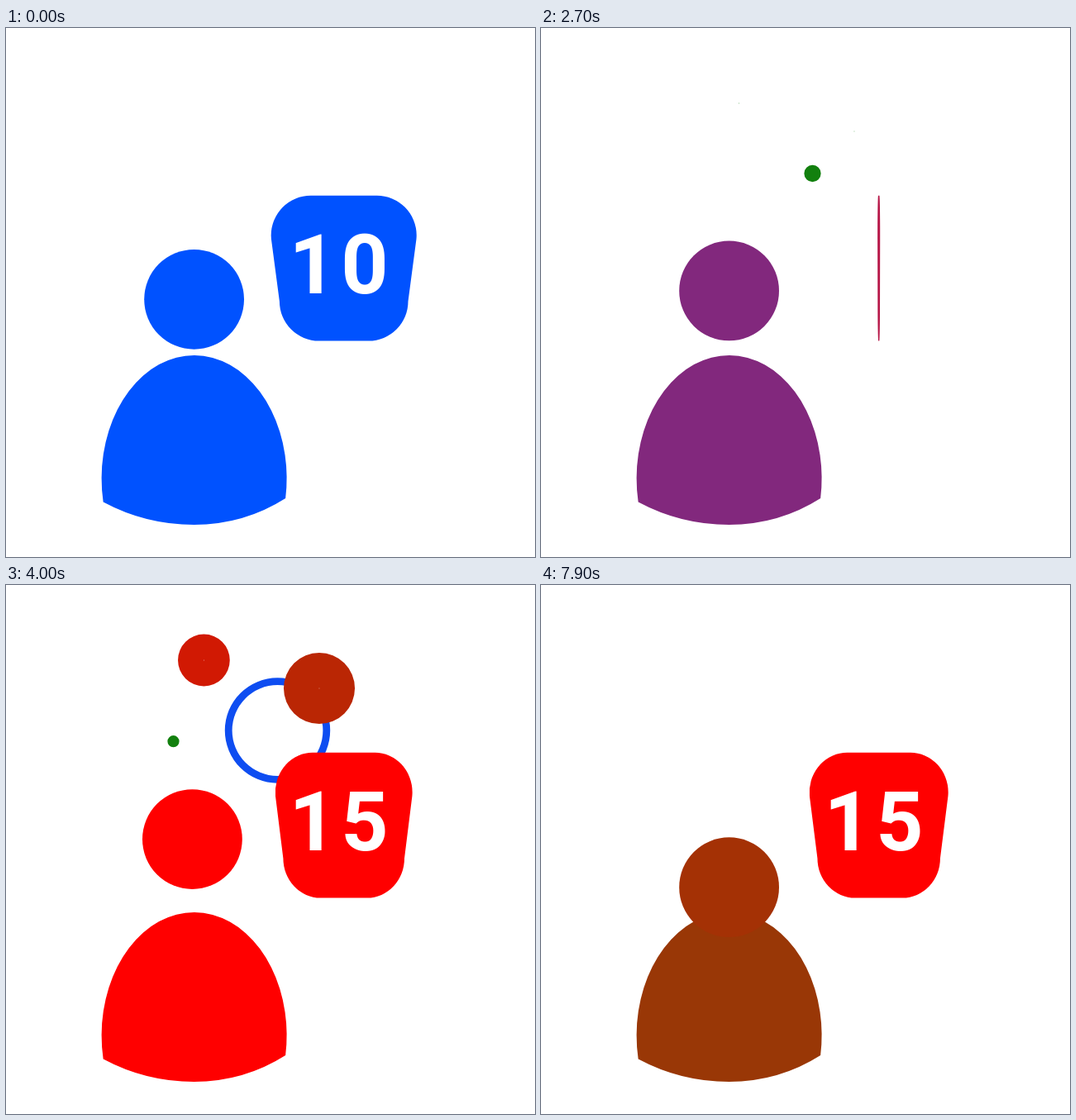
An HTML page with a canvas for the animation above (8 s loop, 640 by 640 pixels).

```html
<!DOCTYPE html>
<html lang="en">
<head>
<meta charset="utf-8">
<title>Counter badge</title>
<style>
  html, body { margin: 0; width: 100%; height: 100%; overflow: hidden; background: #fff; }
  canvas { display: block; width: 100vw; height: 100vh; }
</style>
</head>
<body>
<canvas id="stage" width="640" height="640"></canvas>
<script>
const ctx = document.getElementById('stage').getContext('2d');
const LOOP = 8000, STEP = 100, TURN = 2 * Math.PI;
const BLUE = [0, 82, 255], RED = [255, 0, 0], GREEN = [18, 128, 14];

const clamp = v => Math.min(1, Math.max(0, v));
const mix = (a, b, p) => a.map((v, i) => v + (b[i] - v) * p);
const css = c => `rgb(${c.map(Math.round).join(',')})`;

// Ease from 0 at a, through one half at mid, to 1 at b.
const ease = (t, a, mid, b, power = 2) => t < mid
  ? 0.5 * clamp((t - a) / (mid - a)) ** power
  : 1 - 0.5 * clamp((b - t) / (b - mid)) ** power;
const smooth = (t, a, b) => ease(t, a, (a + b) / 2, b);

const toRed = t => ease(t, 400, 2690, 3950);
const toGreen = t => toRed(t - 5377);

const shrink = t => ease(t, 1130, 2265, 2800);
const badgeWidth = t => 1 - shrink(t) + ease(t, 2800, 3340, 4340) - shrink(t - 6427);

const headX = t => 227.6 - 2.2 * (smooth(t, 2700, 3300) - smooth(t, 4000, 4500));
const headY = t => 328.3
  + 17 * smooth(t, 1300, 2050)
  - 38.5 * smooth(t, 2050, 3100)
  + 45 * smooth(t, 3950, 4500)
  - 31 * smooth(t, 4500, 4900)
  + 7 * smooth(t, 4900, 5500)
  + 38.2 * smooth(t, 6400, 8000);

// All bursts share one life cycle and differ in place, size and delay.
const bursts = [
  { x: 328.5, y: 176, r: 63.3, delay: 0 },
  { x: 239.4, y: 91, r: 31.6, delay: 600 },
  { x: 379, y: 125, r: 44, delay: 645 },
  { x: 202.5, y: 189.2, r: 25.5, delay: 1200 }
];

function drawBurst({ x, y, r, delay }, time) {
  const t = time - delay, speck = 0.4;
  if (t < 2050 || t > 4250) return;
  const outer = r * ease(t, 2000, 2940, 3770, 4) + speck;
  const inner = t > 3300 ? outer * ease(t, 3390, 3880, 4330, 4) + speck : 0;
  if (inner >= outer) return;
  const warm = mix(GREEN, RED, smooth(t, 2960, 3600));
  ctx.fillStyle = css(mix(warm, BLUE, smooth(t, 3600, 4080)));
  ctx.beginPath();
  ctx.arc(x, y, outer, 0, TURN);
  ctx.arc(x, y, inner, 0, TURN);
  ctx.fill('evenodd');
}

function drawPerson(t) {
  const base = mix(BLUE, RED, toRed(t));
  ctx.fillStyle = css(mix(base, GREEN, toGreen(t)));
  ctx.beginPath();
  ctx.ellipse(227.6, 545, 112, 149, 0, Math.PI - 0.192, TURN + 0.162);
  ctx.quadraticCurveTo(287.7, 601, 227.5, 601);
  ctx.quadraticCurveTo(169, 601, 117.7, 573.5);
  ctx.fill();

  ctx.fillStyle = css(mix(base, GREEN, toGreen(t - 120)));
  ctx.beginPath();
  ctx.arc(headX(t), headY(t), 60.4, 0, TURN);
  ctx.fill();
}

function drawBadge(t) {
  const quarter = TURN / 4, tilt = 0.1;
  ctx.save();
  ctx.translate(408.7, 0);
  ctx.scale(badgeWidth(t), 1);
  ctx.fillStyle = css(mix(BLUE, RED, ease(t, 1300, 2300, 3900)));
  ctx.beginPath();
  ctx.arc(40, 250.8, 48, -quarter, tilt);
  ctx.arc(30, 330.8, 47.8, 0, quarter);
  ctx.arc(-30, 330.8, 47.8, quarter, 2 * quarter);
  ctx.arc(-40, 250.8, 48, 2 * quarter - tilt, 3 * quarter);
  ctx.fill();
  ctx.restore();

  const before = t < 2700;
  ctx.globalAlpha = before ? 1 - smooth(t, 1500, 2000) : smooth(t, 3450, 3950);
  ctx.fillStyle = '#fff';
  ctx.font = 'bold 100px Roboto, sans-serif';
  ctx.fillText('1', 342.5, 320.6);
  ctx.fillText(before ? '0' : '5', 405.3, 320.6);
  ctx.globalAlpha = 1;
}

function draw(now) {
  const t = Math.floor(now % LOOP / STEP) * STEP;
  ctx.fillStyle = '#fff';
  ctx.fillRect(0, 0, 640, 640);
  drawPerson(t);
  bursts.forEach(b => drawBurst(b, t));
  drawBadge(t);
}

let start;
function tick(now) {
  start ??= now;
  draw(Math.max(0, now - start));
  requestAnimationFrame(tick);
}
draw(0);
requestAnimationFrame(tick);
</script>
</body>
</html>
```
